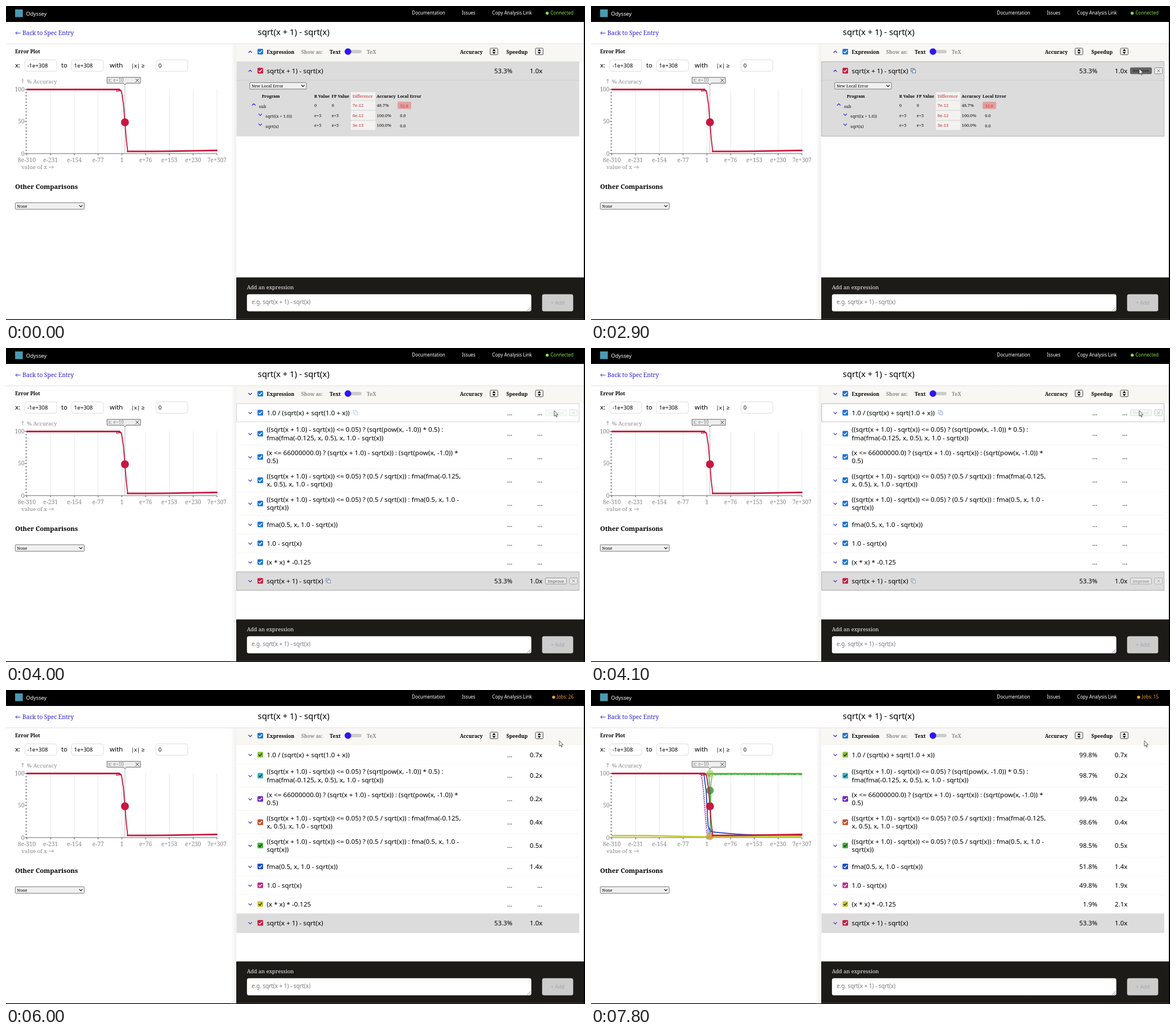
Write an HTML page that moves like this. It is 1016 px wide and 551 px high and loops after 8 s.

```html
<!DOCTYPE html>
<html lang="en">
<head>
<meta charset="utf-8">
<title>Expression comparison</title>
<style>
  html, body { margin: 0; width: 100%; height: 100%; overflow: hidden; background: #000; }
  svg { display: block; width: 1016px; height: 551px; }
  text { font-family: "Noto Sans", sans-serif; white-space: pre; }
  .medium { font-weight: 500; }
  .serif { font-family: "Noto Serif", serif; }
  .bold { font-family: "Noto Serif", serif; font-weight: 700; }
</style>
</head>
<body>
<svg id="stage" viewBox="0 0 1016 551"></svg>
<script>
const LOOP = 8000, STEP = 100;
const RED = '#c8183f', LINK = '#2a1ed0';

const EXPRESSIONS = [
  { lines: ['1.0 / (sqrt(x) + sqrt(1.0 + x))'], color: '#8cc43c', dark: true, accuracy: '99.8%', speedup: '0.7x' },
  { lines: ['((sqrt(x + 1.0) - sqrt(x)) <= 0.05) ? (sqrt(pow(x, -1.0)) * 0.5) :', 'fma(fma(-0.125, x, 0.5), x, 1.0 - sqrt(x))'], color: '#30b8c8', dark: true, accuracy: '98.7%', speedup: '0.2x' },
  { lines: ['(x <= 66000000.0) ? (sqrt(x + 1.0) - sqrt(x)) : (sqrt(pow(x, -1.0)) *', '0.5)'], color: '#7028c0', accuracy: '99.4%', speedup: '0.2x' },
  { lines: ['((sqrt(x + 1.0) - sqrt(x)) <= 0.05) ? (0.5 / sqrt(x)) : fma(fma(-0.125,', 'x, 0.5), x, 1.0 - sqrt(x))'], color: '#c8502a', accuracy: '98.6%', speedup: '0.4x' },
  { lines: ['((sqrt(x + 1.0) - sqrt(x)) <= 0.05) ? (0.5 / sqrt(x)) : fma(0.5, x, 1.0 -', 'sqrt(x))'], color: '#3cb832', dark: true, accuracy: '98.5%', speedup: '0.5x' },
  { lines: ['fma(0.5, x, 1.0 - sqrt(x))'], color: '#1848c8', accuracy: '51.8%', speedup: '1.4x' },
  { lines: ['1.0 - sqrt(x)'], color: '#c02890', accuracy: '49.8%', speedup: '1.9x' },
  { lines: ['(x * x) * -0.125'], color: '#c8c832', dark: true, accuracy: '1.9%', speedup: '2.1x' },
];
const SPEC = { lines: ['sqrt(x + 1) - sqrt(x)'], color: RED, accuracy: '53.3%', speedup: '1.0x' };

const clamp = v => Math.max(0, Math.min(1, v));
const escape = s => s.replace(/&/g, '&amp;').replace(/</g, '&lt;');
const text = (x, y, s, size, fill = '#000', cls = '', anchor = 'start') =>
  `<text x="${x}" y="${y}" font-size="${size}" fill="${fill}" class="${cls}" text-anchor="${anchor}">${escape(s)}</text>`;
const box = (x, y, w, h, fill, stroke = 'none', r = 0) =>
  `<rect x="${x}" y="${y}" width="${w}" height="${h}" rx="${r}" fill="${fill}" stroke="${stroke}"/>`;
const path = (d, stroke, width = 1, fill = 'none', dash = 'none') =>
  `<path d="${d}" stroke="${stroke}" stroke-width="${width}" fill="${fill}" stroke-linejoin="round" stroke-dasharray="${dash}"/>`;
const dot = (x, y, r, fill, opacity = 1) =>
  `<circle cx="${x}" cy="${y}" r="${r}" fill="${fill}" opacity="${opacity}"/>`;
const chevron = (x, y, up, color = LINK, w = 3) => {
  const d = up ? -w / 2 : w / 2;
  return path(`M${x - w} ${y - d}L${x} ${y + d}L${x + w} ${y - d}`, color, 1.1);
};
const checkbox = (y, fill, dark) => box(441.3, y - 4.9, 9.8, 9.8, fill, 'none', 1.5) +
  path(`M443.4 ${y}l2 2.2l3.8 -4.4`, dark ? '#222' : '#fff', 1.4);
const select = (x, y, w, label) => box(x, y, w, 11.5, '#f0f0f0', '#777', 1) +
  text(x + 3.2, y + 8.6, label, 7.1, '#000', 'serif') + chevron(x + w - 6, y + 5.8, false, '#111', 2.8);
const field = (x, value) => box(x, 94.5, 56, 20, '#fff', '#ddd', 4) + text(x + 4.5, 107.8, value, 9.6);
const cross = (x, y, r, color) =>
  path(`M${x - r} ${y - r}L${x + r} ${y + r}M${x + r} ${y - r}L${x - r} ${y + r}`, color, .9);

function chrome() {
  const sorter = x => box(x, 74, 13.5, 11.5, '#efefef', '#555', 1.5) +
    path(`M${x + 4} 79L${x + 6.75} 75.6L${x + 9.5} 79ZM${x + 4} 80.8L${x + 6.75} 84.2L${x + 9.5} 80.8Z`, 'none', 0, '#000');
  return `<defs>
    <linearGradient id="side"><stop stop-color="#fff"/><stop offset="1" stop-color="#f0f0f0"/></linearGradient>
    <linearGradient id="under" x2="0" y2="1"><stop stop-color="#e4e4e2"/><stop offset="1" stop-color="#fff" stop-opacity="0"/></linearGradient></defs>` +
    box(0, 0, 1016, 551, '#000') + box(0, 28, 1014, 521.7, '#fff') +
    box(394, 66, 10, 483.7, 'url(#side)') + box(404, 66, 610, 31, '#f9f7f3') +
    box(0, 65.5, 1014, 4, 'url(#under)') +
    box(16, 6, 13.5, 13.5, '#4a9ab0') + text(35.3, 16.6, 'Odyssey', 9.2, '#fff', 'medium') +
    text(712.3, 15.3, 'Documentation', 8, '#fff', 'medium') + text(800, 15.3, 'Issues', 8, '#fff', 'medium') +
    text(853, 15.3, 'Copy Analysis Link', 8.15, '#fff', 'medium') +
    path('M25.5 47.5H16.8M19.8 44.7L16.8 47.5L19.8 50.3', LINK, .9) +
    text(28.8, 50.8, 'Back to Spec Entry', 10.2, LINK, 'serif') +
    text(441.8, 51.2, 'sqrt(x + 1) - sqrt(x)', 14.8, '#000', 'medium') +
    text(16, 83.3, 'Error Plot', 8.6, '#000', 'bold') +
    text(16, 107.8, 'x:', 11.5) + field(33, '-1e+308') + text(97, 107.8, 'to', 10.9) + field(115, '1e+308') +
    text(182, 107.8, 'with', 11.4) + text(219.5, 107.8, '|x| ≥', 9.6) + field(263, '0') +
    text(16, 321, 'Other Comparisons', 11.2, '#000', 'bold') + select(16.3, 345.2, 121, 'None') +
    checkbox(80.2, '#1a73d8') + text(457.5, 83.8, 'Expression', 8.6, '#000', 'bold') +
    text(518, 83.8, 'Show as:', 8.6, '#888', 'bold') + text(568, 83.8, 'Text', 8.6, '#000', 'bold') +
    text(633, 83.8, 'TeX', 8.6, '#888', 'bold') + box(599, 77, 25, 6, '#ccc', 'none', 3) + dot(600, 80, 5.8, '#2e14f0') +
    text(796.5, 83.8, 'Accuracy', 8.6, '#000', 'bold') + sorter(849.5) +
    text(878, 83.8, 'Speedup', 8.6, '#000', 'bold') + sorter(929) +
    box(404, 476.3, 610, 73.4, '#1c1b18') + text(422.7, 496.5, 'Add an expression', 9.35, '#f4f4f4', 'serif') +
    box(422.8, 505.8, 499, 30, '#fff', 'none', 3.5) + text(431, 523.2, 'e.g. sqrt(x + 1) - sqrt(x)', 9.85, '#757575') +
    path('M914.5 535L920.5 529M918 535L920.5 532.5', '#666', .8) +
    box(940.7, 505.8, 54.6, 30, '#ccc', 'none', 3.5) + text(968, 523.7, '+ Add', 8.9, '#a3a3a3', '', 'middle');
}

const jitter = n => { const v = Math.sin(n * 127.1) * 43758.5; return v - Math.floor(v); };
const speckle = (x0, x1, y, spread, color, seed) => Array.from({ length: Math.round((x1 - x0) / 2) }, (_, i) =>
  dot(x0 + i * 2, (y + (jitter(i + seed) - .4) * spread).toFixed(1), 1, color)).join('');

// One drawing rule per expression, in the order of the list.
const TOP = 'M36 146.5H';
const CURVES = [
  c => path(TOP + '370', c, 2),
  c => path(TOP + '203L207 152L211 147H370', c, 1),
  c => path('M188 147L194 149L198 180L203 243', c, 1.3, 'none', '2 1.5'),
  c => path(TOP + '205L207 150L210 147H370', c, 1),
  c => path(TOP + '206L208.7 176L209.5 250L210.5 165L213 147.2H370', c, 1.2) +
    path('M212 147.2H370', c, 2.6) + speckle(212, 371, 147.4, 2.6, c, 7) + dot(205.5, 200, .9, c) + dot(204.5, 221, .9, c),
  c => path(TOP + '198L202 178L205.5 238Q207.5 247.5 214 249.2Q260 254.5 310 254.6L370 255', c, 1.7),
  c => path('M190 147L195 158L199 208L203 254L208 258H370', c, .9, 'none', '2 2'),
  c => path('M36 255.6H100C135 255.8 160 257.4 205 257.6H370', c, 2.6),
];
const DRAW_ORDER = [0, 1, 2, 3, 6, 5, 7, 4];

function plot(shown) {
  let out = path('M29.3 135.5V128.5M27.2 130.8L29.3 128.5L31.4 130.8', '#888', .8) +
    text(36.8, 135.5, '% Accuracy', 9.5, '#888', 'serif');
  ['8e-310', 'e-231', 'e-154', 'e-77', '1', 'e+76', 'e+153', 'e+230', '7e+307'].forEach((label, i) => {
    const x = 36.5 + i * 41.7;
    out += path(`M${x} 146V259`, '#e8e8e8') + path(`M${x} 259v3`, '#333', .8) +
      text(x, 273.8, label, 10.2, '#888', 'serif', 'middle');
  });
  for (let i = 0; i <= 20; i++) {
    const y = 259 - i * 5.63;
    out += path(`M${i % 10 ? 34 : 33} ${y}H36.8`, '#333', .9);
    if (i % 10 === 0) out += text(32.5, y + 3.6, String(i * 5), 10.2, '#888', 'serif', 'end');
  }
  out += path('M36 259H370', '#444', .8) + text(27, 286, 'value of x', 9.6, '#888', 'serif') +
    path('M75 282.8H83.5M80.8 280.3L83.5 282.8L80.8 285.3', '#888', .8);
  out += path('M208.7 139V259', '#bbb', 1);
  for (const i of DRAW_ORDER) if (shown > i) out += CURVES[i](EXPRESSIONS[i].color);
  if (shown > 0) out += dot(208.7, 146.5, 6.7, '#8cc43c', .5);
  if (shown > 4) out += dot(208.7, 176.2, 6.7, '#358f38', .8);
  if (shown > 5) out += dot(208.2, 248, 6, '#1848c8', .35);
  if (shown > 7) out += dot(208.7, 257, 6.5, '#c8973c', .75);
  out += path('M36 146.5H200', RED, 2.8) +
    path('M199 147Q202 147 203 152L206 171L208.7 204L211 233L213.6 255', RED, 1.8) +
    path('M212 255.2C270 255.2 320 254.6 371 253.4', RED, 2.7) + speckle(194, 203, 148.6, 2, RED, 3) +
    dot(208.7, 204, 7, RED);
  return out + path('M177.3 125.2H236V135.4H211L208.7 138.6L206.4 135.4H177.3Z', '#555', .9, '#eee') +
    text(179, 133, 'x: e+10', 8.3, '#888', 'serif') + cross(230.3, 130.5, 2.9, '#222');
}

function localErrors() {
  const headings = [[449, 'Program'], [541, 'R Value'], [571.3, 'FP Value'], [650.3, 'Accuracy'], [687, 'Local Error']];
  const rows = [
    [177, 'sub', '0', '0', '7e-12', '48.7%', '32.8'],
    [194.6, 'sqrt((x + 1.0))', 'e+5', 'e+5', '6e-12', '100.0%', '0.0'],
    [212.2, 'sqrt(x)', 'e+5', 'e+5', '3e-13', '100.0%', '0.0'],
  ];
  let out = select(427.7, 134.3, 99.5, 'New Local Error') + box(605, 151, 43.3, 14.3, '#f3f2f0') +
    text(608, 160.8, 'Difference', 7.15, '#b82a32', 'serif');
  for (const [x, s] of headings) out += text(x, 160.8, s, 7.15, '#000', 'bold');
  rows.forEach(([y, name, real, float, difference, accuracy, error], i) => {
    const indent = i ? 11.3 : 0;
    out += chevron(434.8 + indent, y - 4, !i) + text(444 + indent, y + 1.5, name, 7.4, '#111', 'serif') +
      text(541, y, real, 7.5, '#111', 'serif') + text(571.5, y, float, 7.5, '#111', 'serif') +
      box(605, y - 10.7, 43.3, 16, '#f3f2f0') + text(608, y, difference, 7.7, '#b82a32', 'serif') +
      text(650.5, y, accuracy, 7.5, '#111', 'serif');
    if (!i) out += box(687, 168, 24, 12.7, '#e2a0a0', 'none', 2);
    out += text(691.3, y + .6, error, 7.5, i ? '#111' : '#c03a3f', 'serif');
  });
  return out;
}

function rowTools(row, y, look, opacity) {
  if (opacity <= 0) return '';
  const iconX = row === SPEC ? 561.5 : 609.3;
  const [fill, ink, edge] = {
    normal: ['#efefef', '#222', '#777'], disabled: ['#f1f1f1', '#aaa', '#bbb'], pressed: ['#666', '#1c1c1c', '#555'],
  }[look];
  return `<g opacity="${opacity}">` + box(iconX, y - 4, 5.4, 5.4, 'none', '#55789f') +
    box(iconX + 2.6, y - 1.5, 5.4, 5.4, '#e8eef4', '#55789f') +
    box(946.5, y - 5.2, 37, 10.6, fill, edge, 1.5) + text(965, y + 2.8, 'Improve', 7.3, ink, '', 'middle') +
    box(989, y - 5.2, 13.6, 10.6, '#f1f1f1', '#888', 1.5) + cross(995.8, y + .1, 2.5, '#555') + '</g>';
}

function listRow(row, top, height, state) {
  const y = top + height / 2 - .2, selected = row === SPEC, lines = row.lines;
  let out = box(404.5, top, 601.5, state.open ? 131.6 : height, selected ? '#dcdcdc' : '#fff') +
    path(`M404.5 ${top + height}H1006`, selected ? '#cfcfcf' : '#e8e8e8');
  if (state.hover > 0)
    out += `<g opacity="${clamp(state.hover * 2)}">${box(404.7, top + .5, 601, state.open ? 130.8 : height - .8, 'none', '#b4b4b4')}</g>`;
  out += chevron(428.5, y + .4, state.open) + checkbox(y, state.color, state.dark);
  lines.forEach((line, i) => { out += text(457.5, y + 4 + (i - (lines.length - 1) / 2) * 14.2, line, 11.65); });
  return out + text(888.6, y + 4, state.accuracy, 11.3, '#000', '', 'end') +
    text(941.4, y + 4, state.speedup, 11.5, '#000', '', 'end') + rowTools(row, y, state.look, state.hover);
}

const CURSOR_PATH = [[1500, 918, 329], [1800, 934, 238], [2100, 957, 130], [2300, 962, 110],
  [5300, 962, 110], [5400, 967, 98], [5500, 970, 92], [5700, 971, 89]];
function cursorAt(t) {
  if (t < 1500) return null;
  const next = CURSOR_PATH.findIndex(key => key[0] > t);
  if (next < 0) return CURSOR_PATH[CURSOR_PATH.length - 1].slice(1);
  const [t0, x0, y0] = CURSOR_PATH[next - 1], [t1, x1, y1] = CURSOR_PATH[next];
  const p = (t - t0) / (t1 - t0);
  return [x0 + (x1 - x0) * p, y0 + (y1 - y0) * p];
}

function status(t, finished) {
  let jobs = 0;
  if (t >= 3100 && t < 3700) jobs = 1;
  else if (t >= 7800) jobs = 15;
  else if (t >= 7200) jobs = 16;
  else if (t >= 6700) jobs = Math.max(17, 21 - (t - 6700) / 50);
  else if (t >= 4300) jobs = 32 - finished;
  const color = jobs ? '#f2a33a' : '#84e04a';
  return dot(jobs ? (jobs > 9 ? 961 : 965) : 949.6, 12.6, 2.7, color) +
    text(996, 15.3, jobs ? 'Jobs: ' + jobs : 'Connected', 8, color, 'medium', 'end');
}

function render(t) {
  const expanded = t < 3100, listed = t >= 3900;
  const timed = Math.max(0, Math.min(8, Math.floor((t - 5400) / 100)));
  const measured = t < 7100 ? 0 : Math.min(8, (t - 7100) / 50 + 1);
  const cursor = cursorAt(t);
  const over = cursor && cursor[1] > 97 && cursor[1] < 229 ? 1 : 0;
  const fade = clamp((t - 3850) / 500);
  let out = chrome() + status(t, timed) + plot(measured) + chevron(428.5, 80.5, expanded);
  let top = 97.2;
  if (listed) EXPRESSIONS.forEach((row, i) => {
    const height = row.lines.length > 1 ? 40.8 : 33, colored = t >= 4300;
    out += listRow(row, top, height, {
      color: colored ? row.color : '#1a73d8', dark: colored && row.dark,
      accuracy: measured > i ? row.accuracy : '...', speedup: timed > i ? row.speedup : '...',
      hover: i ? 0 : over * fade, look: 'disabled',
    });
    top += height;
  });
  out += listRow(SPEC, top, 33, {
    ...SPEC, open: expanded, hover: listed ? 1 - fade : over,
    look: t >= 3100 && t < 3700 ? 'disabled' : t >= 2900 && t < 3100 ? 'pressed' : 'normal',
  });
  if (expanded) out += localErrors();
  if (cursor) out += `<g transform="translate(${cursor})">` +
    path('M0 0V9.6L2.2 7.6L3.7 11.2L5.2 10.5L3.7 7.1H6.8Z', '#333', .8, '#fff') + '</g>';
  document.getElementById('stage').innerHTML = out;
}

let drawn = -1;
function tick(now) {
  const t = Math.floor((now % LOOP) / STEP) * STEP;
  if (t !== drawn) render(drawn = t);
  requestAnimationFrame(tick);
}
render(0);
requestAnimationFrame(tick);
</script>
</body>
</html>
```
